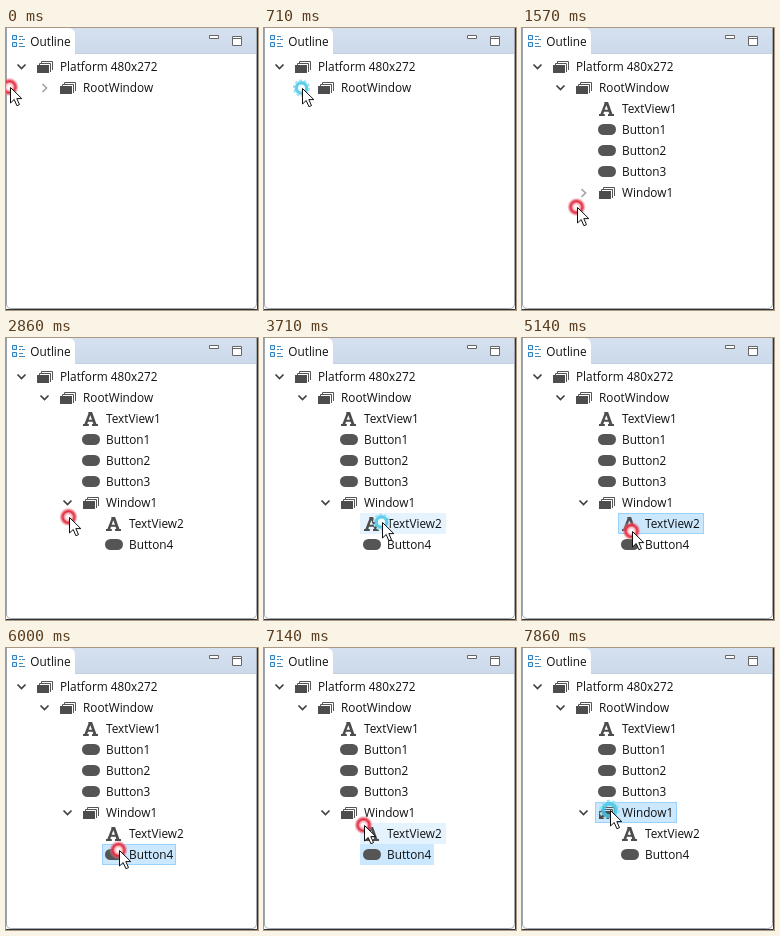
These frames come from a looping animation (252 px wide and 282 px high, 8 s). An HTML page:

```html
<!DOCTYPE html>
<html lang="en">
<head>
<meta charset="utf-8">
<title>Outline tree</title>
<style>
  html, body { margin: 0; width: 100%; height: 100%; overflow: hidden; background: #fff; }
  svg { display: block; width: 252px; height: 282px; }
  text { font: 11.8px "Open Sans", "Noto Sans", sans-serif; fill: #111; }
  .chevron { fill: none; stroke-width: 1.7; }
</style>
</head>
<body>
<svg viewBox="0 0 252 282">
  <defs>
    <linearGradient id="bar" x2="0" y2="1">
      <stop stop-color="#d6e1f0"/><stop offset="1" stop-color="#cbd9ea"/>
    </linearGradient>
    <radialGradient id="red">
      <stop offset=".2" stop-color="#fff4f5"/><stop offset=".4" stop-color="#f7b0b7"/>
      <stop offset=".58" stop-color="#e02a40"/><stop offset=".74" stop-color="#e4475a" stop-opacity=".8"/>
      <stop offset="1" stop-color="#f6a3ab" stop-opacity="0"/>
    </radialGradient>
    <g id="window">
      <path d="M4.500 2V.5h11V9M2.500 4V2.500h11V11" fill="none" stroke="#555"/>
      <path d="M0 4h12v8H0z" fill="#4d4d4d"/>
    </g>
    <path id="text" d="M5.300 0h3.800l4.300 12H15v2H9v-2h1.300l-.7-2.200H5L4.300 12h1.500v2H0v-2h1.400l4-10.200zM7.300 3.200 5.700 7.800H9z" fill="#4d4d4d" fill-rule="evenodd"/>
    <rect id="button" width="18" height="11" rx="5.500" fill="#555"/>
  </defs>

  <rect width="252" height="282" fill="#fff"/>
  <path d="M0 0h251v26H0z" fill="url(#bar)"/>
  <path d="M0 26V0h62q7 0 7 7v19z" fill="#fff"/>
  <path d="M69 25.500h181" stroke="#c3d0e0"/>
  <path d="M.5 0v276q0 4.500 5 4.500h240q5 0 5-5V0" fill="none" stroke="#9fa6b0"/>
  <path d="M251.500 0v281.500H0" fill="none" stroke="#333"/>
  <g fill="none">
    <path d="M6.500 7.500h4v4h-4zM6.500 14.500h4v4h-4z" stroke="#2f7fc1" fill="#d9ecfb"/>
    <path d="M13 8.500h4M13 11.500h2M16 11.500h3M13 15.500h4M13 18.500h6" stroke="#4588b8"/>
    <path d="M203.500 7.500h9v3h-9zM226.500 8.500h9v9h-9zM226 10.500h10" stroke="#666" fill="#fff"/>
  </g>
  <text x="24.300" y="18">Outline</text>

  <g id="tree"></g>
  <g id="pointer">
    <circle id="redHalo" cx="-.5" r="9.500" fill="url(#red)"/>
    <g id="blueHalo">
      <circle id="ring" r="5.500" stroke="#48c5e6" stroke-opacity=".85" stroke-width="3.500"/>
      <circle r="8" fill="none" stroke="#9be2f4" stroke-width="2" stroke-dasharray="3 2"/>
    </g>
    <path d="M.5.5v15.500l3.700-3.500 2.700 6.200 2.600-1.100-2.700-6h5z" fill="#fff" stroke="#111"/>
  </g>
</svg>
<script>
const STEPS = 56, LOOP = 8000;
const $ = id => document.getElementById(id);

// label, depth, icon, label width, step shown, step expanded (null for leaves)
const rows = [
  ["Platform 480x272", 0, "window", 98, 0, 0],
  ["RootWindow", 1, "window", 69, 0, 6],
  ["TextView1", 2, "text", 55, 6, null],
  ["Button1", 2, "button", 43, 6, null],
  ["Button2", 2, "button", 43, 6, null],
  ["Button3", 2, "button", 43, 6, null],
  ["Window1", 2, "window", 51, 6, 16],
  ["TextView2", 3, "text", 55, 16, null],
  ["Button4", 3, "button", 43, 16, null]
];
const iconOffset = { window: [0, -5], text: [0, -6], button: [-1, -5] };

// step, x, y of the pointer tip
const path = [
  [0, 4, 59], [4, 38, 60], [6, 38, 60], [8, 42, 85], [11, 55, 179],
  [13, 60, 165], [16, 60, 165], [20, 63, 179], [23, 92, 186], [26, 118, 184],
  [29, 118, 184], [33, 114, 184], [36, 110, 193], [38, 112, 202],
  [42, 113, 202], [48, 107, 198], [50, 100, 177], [53, 88, 162], [56, 88, 162]
];
const clicks = [5, 15, 26, 39, 54];
const selections = [[27, 7], [40, 8], [55, 6]];

const views = rows.map(([label, depth, icon, width, shown, opened], i) => {
  const x = 31 + 23 * depth, y = 38 + 21 * i;
  const [dx, dy] = iconOffset[icon];
  const group = document.createElementNS("http://www.w3.org/2000/svg", "g");
  group.innerHTML = `<rect x="${x - 3.5}" y="${y - 9.5}" width="${width + 30}" height="20"/>
    ${opened === null ? "" : '<path class="chevron"/>'}
    <use href="#${icon}" x="${x + dx}" y="${y + dy}"/>
    <text x="${x + 23}" y="${y + 5}">${label}</text>`;
  $("tree").append(group);
  return { group, box: group.querySelector("rect"), chevron: group.querySelector("path"),
    x, y, width, shown, opened };
});

function pointerAt(step) {
  const i = path.findIndex(key => key[0] > step);
  const [s0, x0, y0] = path[i - 1], [s1, x1, y1] = path[i];
  const p = (step - s0) / (s1 - s0), ease = p * p * (3 - 2 * p);
  return [x0 + (x1 - x0) * ease, y0 + (y1 - y0) * ease].map(Math.round);
}

function drawRow(row, step, px, py, selected) {
  const visible = step >= row.shown;
  row.group.style.display = visible ? "" : "none";
  const hover = visible && px >= row.x - 4 && px < row.x + row.width + 27 &&
    py >= row.y - 10 && py <= row.y + 10;
  const fill = selected ? "#cce8ff" : hover ? "#e5f3ff" : "none";
  row.box.setAttribute("fill", fill);
  row.box.setAttribute("stroke", selected && hover ? "#99d1ff" : fill);
  if (row.chevron) {
    const open = step >= row.opened, cx = row.x - 15.5;
    row.chevron.setAttribute("d", open ? `M${cx - 4} ${row.y - 1.5}l4 4 4-4` : `M${cx - 2} ${row.y - 3}l4 4-4 4`);
    row.chevron.setAttribute("stroke", open ? "#404040" : "#a6a6a6");
  }
}

// A click shows a solid ring first, then a wider burst with a clear centre.
function drawHalo(step) {
  const click = clicks.find(s => step === s || step === s + 1);
  const pressed = click !== undefined, burst = step > click;
  $("redHalo").style.display = pressed ? "none" : "";
  $("blueHalo").style.display = pressed ? "" : "none";
  $("blueHalo").setAttribute("transform", `translate(-.5 0) scale(${burst ? 1.15 : 0.95})`);
  $("ring").setAttribute("fill", burst ? "none" : "#f2fcff");
}

function draw(now) {
  const step = Math.floor((now % LOOP + 8) * STEPS / LOOP) % STEPS;
  const [px, py] = pointerAt(step);
  const selected = selections.filter(([s]) => s <= step).pop()?.[1];
  views.forEach((row, i) => drawRow(row, step, px, py, i === selected));
  $("pointer").setAttribute("transform", `translate(${px} ${py})`);
  drawHalo(step);
}

const start = performance.now();
function tick() {
  draw(performance.now() - start);
  requestAnimationFrame(tick);
}
tick();
</script>
</body>
</html>
```
